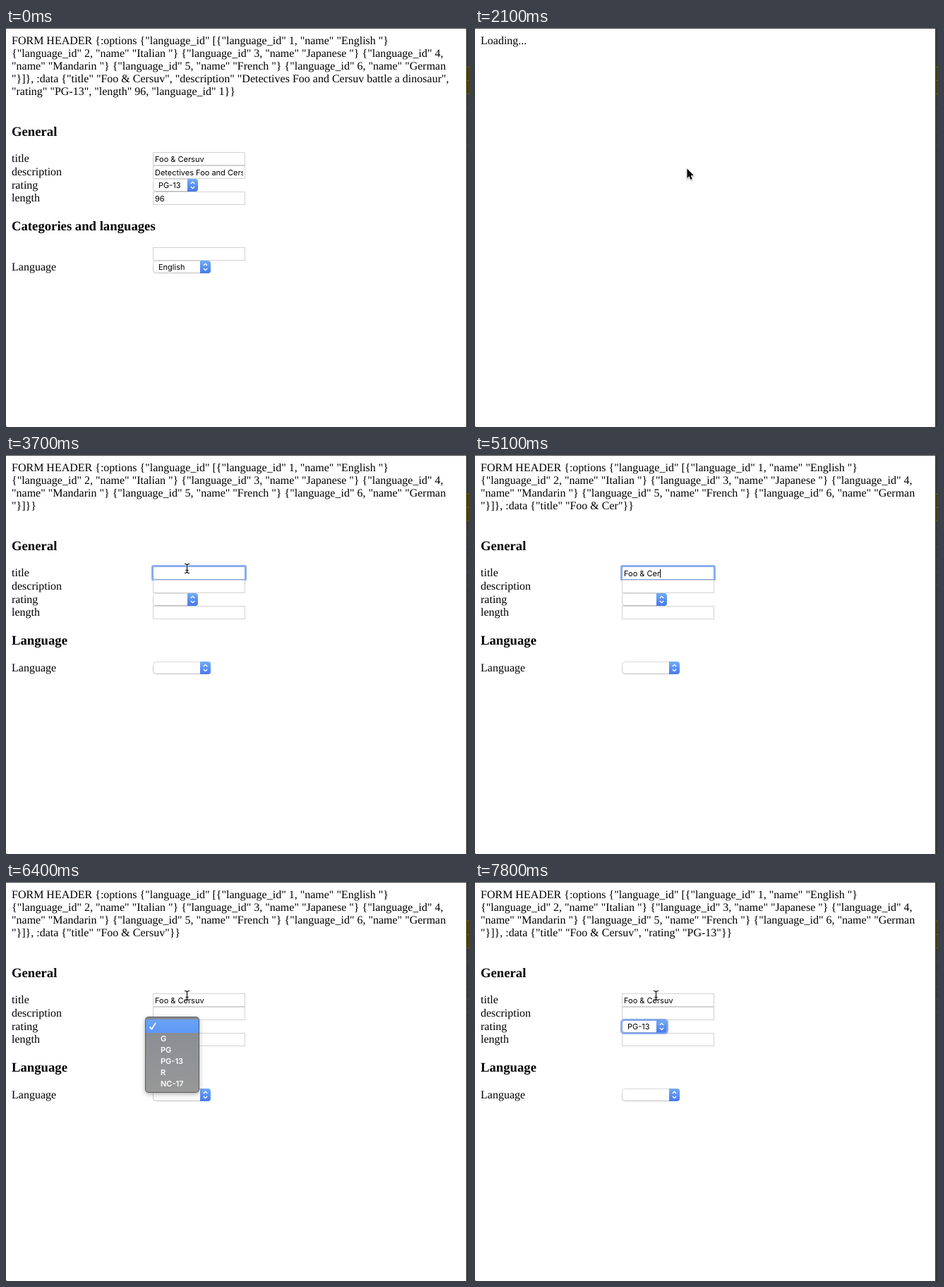
Write an HTML page with a canvas that moves like this. It is 656x566 px and loops after 8000 ms.

```html
<!DOCTYPE html>
<html lang="en">
<head>
<meta charset="utf-8">
<title>Form demo</title>
<style>
html, body { margin: 0; width: 100%; height: 100%; overflow: hidden; background: #fff; }
canvas { display: block; }
</style>
</head>
<body>
<canvas id="stage" width="656" height="566"></canvas>
<script>
const ctx = document.getElementById('stage').getContext('2d');
if ('textRendering' in ctx) ctx.textRendering = 'geometricPrecision';

const LOOP = 8000, STEP = 100;
const SERIF = '16px "Liberation Serif", Times, serif';
const HEADING = 'bold 18.72px "Liberation Serif", Times, serif';
const SANS = '11px Inter, Arial, sans-serif';
const MENU = '600 11px Inter, Arial, sans-serif';

const NAME = 'Cersuv';
const TITLE = 'Foo & ' + NAME;
const PLOT = `Detectives Foo and ${NAME} battle a dinosaur`;
const OPTIONS = [
  'FORM HEADER {:options {"language_id" [{"language_id" 1, "name" "English "}',
  '{"language_id" 2, "name" "Italian "} {"language_id" 3, "name" "Japanese "} {"language_id" 4,',
  '"name" "Mandarin "} {"language_id" 5, "name" "French "} {"language_id" 6, "name" "German'
];
const RATINGS = ['', 'G', 'PG', 'PG-13', 'R', 'NC-17'];
const KEY_TIMES = [3900, 4000, 4200, 4400, 4600, 4800, 4900, 5000, 5100, 5200, 5400, 5500];

function text(str, x, y, font = SERIF, color = '#000') {
  ctx.font = font;
  ctx.fillStyle = color;
  ctx.fillText(str, x, y);
}

function rect(x, y, w, h, color) {
  ctx.fillStyle = color;
  ctx.fillRect(x, y, w, h);
}

function round(x, y, w, h, r) {
  ctx.beginPath();
  ctx.roundRect(x, y, w, h, r);
}

function fade(y0, y1, top, bottom) {
  const g = ctx.createLinearGradient(0, y0, 0, y1);
  g.addColorStop(0, top);
  g.addColorStop(1, bottom);
  return g;
}

function line(points, color, width) {
  ctx.beginPath();
  points.forEach(([x, y]) => ctx.lineTo(x, y));
  ctx.strokeStyle = color;
  ctx.lineWidth = width;
  ctx.stroke();
}

function ring(x, y, w, h, r) {
  round(x - 0.5, y - 0.5, w + 1, h + 1, r);
  ctx.strokeStyle = 'rgba(100,148,236,0.72)';
  ctx.lineWidth = 3;
  ctx.stroke();
}

function input(y, value = '', focus = false, caret = false) {
  rect(208, y, 131, 19, '#d2d2d2');
  rect(209, y + 1, 129, 17, '#fff');
  if (focus) ring(208, y, 131, 19, 1.5);
  ctx.save();
  ctx.beginPath();
  ctx.rect(210, y + 1, 126, 17);
  ctx.clip();
  text(value, 211, y + 14, SANS);
  if (caret) rect(Math.round(211 + ctx.measureText(value).width), y + 4, 1, 12, '#000');
  ctx.restore();
}

function select(y, w, value = '', focus = false) {
  const right = 208 + w;
  round(208.5, y + 0.5, w - 1, 17, 4);
  ctx.fillStyle = '#fff';
  ctx.fill();
  ctx.strokeStyle = fade(y, y + 18, '#dcdcdc', '#bdbdbd');
  ctx.lineWidth = 1;
  ctx.stroke();
  round(right - 15, y, 15, 18, [0, 4, 4, 0]);
  ctx.fillStyle = fade(y, y + 18, '#72adf6', '#4878ea');
  ctx.fill();
  const cx = right - 7.5, cy = y + 9;
  for (const s of [-1, 1])
    line([[cx - 2.7, cy + 2 * s], [cx, cy + 4.7 * s], [cx + 2.7, cy + 2 * s]], '#fff', 1.3);
  if (focus) ring(208, y, w, 18, 4);
  text(value, 216, y + 13, SANS);
}

function header(tail) {
  [...OPTIONS, ...tail].forEach((s, i) => text(s, 8, 23 + 18 * i));
}

// Rows shared by both versions of the form.
function form(dy, s) {
  text('General', 8, 135 + dy, HEADING);
  ['title', 'description', 'rating', 'length'].forEach((s, i) =>
    text(s, 8, [172, 191, 210, 228][i] + dy));
  input(158 + dy, s.title, s.focus === 'title', s.caret && s.focus === 'title');
  input(177 + dy, s.plot, s.focus === 'plot', s.caret && s.focus === 'plot');
  input(214 + dy, s.length);
  select(196 + dy, 64, s.rating, s.focus === 'rating');
}

function filledForm() {
  header([`"}]}, :data {"title" "${TITLE}", "description" "${PLOT}",`,
    '"rating" "PG-13", "length" 96, "language_id" 1}}']);
  form(18, { title: TITLE, plot: PLOT, rating: 'PG-13', length: '96' });
  text('Categories and languages', 8, 287, HEADING);
  input(311);
  text('Language', 8, 344);
  select(330, 82, 'English');
}

function typedForm(t) {
  const title = TITLE.slice(0, KEY_TIMES.filter(k => k <= t).length);
  const rating = t >= 7700 ? 'PG-13' : '';
  const data = title && `, :data {"title" "${title}"${t >= 7800 ? ', "rating" "PG-13"' : ''}}`;
  const focus = t < 3200 ? '' : t < 5700 ? 'title' : t < 5900 ? 'plot' : 'rating';
  header([`"}]}${data}}`]);
  form(0, { title, rating, focus, caret: t < 3700 || t >= 3900 });
  text('Language', 8, 269, HEADING);
  text('Language', 8, 307);
  select(293, 82);
}

function menu(t) {
  if (t < 6400 || t >= 7700) return;
  const active = t >= 7500 ? (t < 7600 ? -1 : 3) : [6800, 7000, 7300].filter(k => k <= t).length;
  ctx.save();
  if (t >= 7600) ctx.globalAlpha = 0.5;
  ctx.save();
  ctx.shadowColor = 'rgba(0,0,0,0.3)';
  ctx.shadowBlur = 6;
  ctx.shadowOffsetY = 2;
  round(197, 191, 77, 108, 5);
  ctx.fillStyle = '#5c5c5c';
  ctx.fill();
  ctx.restore();
  round(198, 192, 75, 106, 4);
  ctx.fillStyle = fade(192, 298, '#878b92', '#989898');
  ctx.fill();
  RATINGS.forEach((r, i) => {
    const y = 198 + 16 * i;
    const top = i ? y : 195;
    if (i === active) rect(198, top, 75, y + 16 - top, fade(top, y + 16, '#6aa3fa', '#5c98f6'));
    text(r, 219, y + 12, MENU, '#fff');
  });
  line([[203.5, 205.5], [206.5, 208.5], [212, 200]], '#fff', 1.8);
  ctx.restore();
}

function arrow(x, y) {
  ctx.save();
  ctx.translate(x, y);
  ctx.beginPath();
  [[0.5, 0.5], [0.5, 14], [3.5, 11.2], [5.6, 16], [7.8, 15], [5.7, 10.3], [9.8, 10.1]]
    .forEach(([px, py]) => ctx.lineTo(px, py));
  ctx.closePath();
  ctx.shadowColor = 'rgba(0,0,0,0.35)';
  ctx.shadowBlur = 2;
  ctx.shadowOffsetY = 1;
  ctx.strokeStyle = '#fff';
  ctx.lineWidth = 1.6;
  ctx.stroke();
  ctx.shadowColor = 'transparent';
  ctx.fillStyle = '#000';
  ctx.fill();
  ctx.restore();
}

function beam(x, y) {
  const shape = [
    [[x - 3, y - 6.5], [x - 1, y - 6.5], [x + 0.5, y - 5], [x + 2, y - 6.5], [x + 4, y - 6.5]],
    [[x + 0.5, y - 5], [x + 0.5, y + 5]],
    [[x - 3, y + 6.5], [x - 1, y + 6.5], [x + 0.5, y + 5], [x + 2, y + 6.5], [x + 4, y + 6.5]],
    [[x - 1.5, y + 2.5], [x + 2.5, y + 2.5]]
  ];
  shape.forEach(p => line(p, 'rgba(255,255,255,0.7)', 2.4));
  shape.forEach(p => line(p, '#000', 1.1));
}

function glide(t, start, end, from, to) {
  const p = Math.min(1, Math.max(0, (t - start) / (end - start)));
  const e = p * p * (3 - 2 * p);
  return from.map((v, i) => v + (to[i] - v) * e);
}

function pointer(t) {
  if (t < 100 || (t >= 3900 && t < 6400)) return;
  let pos;
  if (t < 1500) pos = glide(t, 0, 700, [640, 566], [346, 481]);
  else if (t < 2500) pos = glide(t, 1400, 1800, [346, 481], [300, 199]);
  else pos = glide(t, 2400, 3100, [300, 199], [256, 161]);
  const [x, y] = pos.map(Math.round);
  if (t >= 2500 && y < 177) beam(x, y);
  else arrow(x, y);
}

function edges(t) {
  const end = t >= 1000 && t < 1500 ? 112 : 93;
  rect(0, 0, 656, 1, '#444');
  rect(0, 565, 1, 1, '#555');
  rect(652, 0, 4, 566, '#3b3b3b');
  rect(652, 54, 4, end - 54, '#48420c');
  for (let y = 55; y <= end; y += 19) rect(653, y, 3, 1, '#68601c');
  for (let y = 112; y < 200; y += 18) if (y > end) rect(653, y, 3, 1, '#464646');
}

function draw(now) {
  const t = Math.floor((now % LOOP) / STEP) * STEP;
  rect(0, 0, 656, 566, '#fff');
  if (t < 1000) filledForm();
  else if (t >= 2200) typedForm(t);
  else if (t >= 2000) text('Loading...', 8, 23);
  menu(t);
  edges(t);
  pointer(t);
}

const begin = performance.now();
function tick() {
  draw(performance.now() - begin);
  requestAnimationFrame(tick);
}
tick();
</script>
</body>
</html>
```
